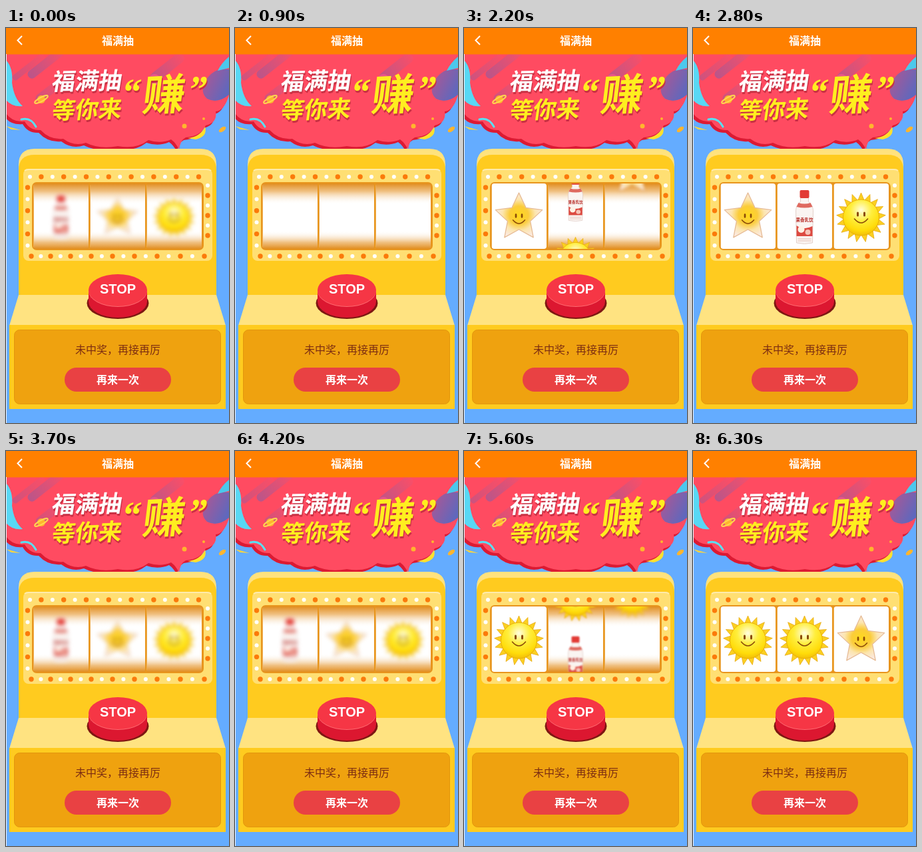
An HTML page that plays this animation: 335 px wide and 592 px high, repeating every 7.1 s.

```html
<!DOCTYPE html>
<html lang="zh-CN">
<head>
<meta charset="utf-8">
<title>福满抽</title>
<style>
html, body { margin: 0; height: 100%; overflow: hidden; background: #64acff; }
svg { display: block; }
#stage { width: 100vw; height: 100vh; }
text { font-family: "Noto Sans CJK SC", "Noto Sans CJK", "Noto Sans", sans-serif; text-anchor: middle; }
.brush { font-weight: 900; font-size: 35px; }
.quote { font-family: "Noto Serif", serif; font-size: 56px; }
.yellow { fill: #ffee1f; }
#slogan { fill: #fff; filter: drop-shadow(1px 3px 0 #c93043); }
</style>
</head>
<body>
<svg id="stage" viewBox="0 0 335 592">
<defs>
  <radialGradient id="sunFill" cy=".3" r=".75"><stop offset="0" stop-color="#fffde0"/><stop offset=".4" stop-color="#ffee3c"/><stop offset=".75" stop-color="#ffdc0a"/><stop offset="1" stop-color="#eeb406"/></radialGradient>
  <radialGradient id="starFill"><stop offset="0" stop-color="#ffd91c"/><stop offset=".4" stop-color="#fbcc3a"/><stop offset=".7" stop-color="#fce5ae"/><stop offset="1" stop-color="#fbe9dc"/></radialGradient>
  <linearGradient id="shade" x2="0" y2="1">
    <stop offset="0" stop-color="#e18d1f"/><stop offset=".12" stop-color="#edb56b" stop-opacity=".85"/><stop offset=".32" stop-color="#fff" stop-opacity="0"/>
    <stop offset=".72" stop-color="#fff" stop-opacity="0"/><stop offset=".9" stop-color="#edb56b" stop-opacity=".85"/><stop offset="1" stop-color="#e18d1f"/>
  </linearGradient>
  <linearGradient id="bar" x2="1"><stop offset="0" stop-color="#9a5a9c"/><stop offset="1" stop-color="#f8506a"/></linearGradient>
  <linearGradient id="orb" x2="1" y2=".6"><stop offset="0" stop-color="#b5558f"/><stop offset="1" stop-color="#5f68bd"/></linearGradient>
  <path id="cloud" d="M0 39H335V101Q328 124 315 125Q318 142 300 146Q293 162 270 164Q262 168 260 182Q255 172 248 167Q232 174 214 168Q196 182 168 177Q140 182 120 172Q102 178 86 166Q66 168 52 153Q36 154 28 140Q10 142 0 128Z"/>
  <g id="face" fill="none" stroke="#8a4a08" stroke-width="1.6" stroke-linecap="round">
    <path d="M-10 2Q0 14 10 2"/><path d="M-5-7v4M5-7v4" stroke-width="3"/>
  </g>
  <g id="sun"><path id="rays" fill="#fbd021" stroke="#e8a914" stroke-width=".8" stroke-linejoin="round"/><circle r="27" fill="url(#sunFill)" stroke="#e8ae0a"/><use href="#face"/></g>
  <g id="star"><path id="points" fill="url(#starFill)" stroke="#e6bb95" stroke-width="1.3" stroke-linejoin="round"/><use href="#face" transform="translate(0 2) scale(.9)"/></g>
  <g id="bottle">
    <path d="M-6-30H6V-24Q13-18 13-10L12 38Q0 41-12 38L-13-10Q-13-18-6-24Z" fill="#faf4f1" stroke="#dcc6bf" stroke-width=".8"/>
    <rect x="-7" y="-41" width="14" height="12" rx="2" fill="#e23b35"/>
    <path d="M-9-22Q0-19 9-22L12-16Q0-13-12-16Z" fill="#df6a60"/>
    <text y="6" font-size="6.5" font-weight="700" fill="#b72a25">果香乳饮</text>
    <path d="M-12 12Q-2 20 12 13L12 28H-12Z" fill="#dc4a41"/>
    <circle cx="-5" cy="18" r="5" fill="#fff0e4"/><circle cx="5" cy="22" r="4" fill="#f6c4b8"/>
    <path d="M-10 32H10M-10 35H10" stroke="#e3bdb5"/>
  </g>
</defs>

<!-- banner -->
<use href="#cloud" x="-3" y="4" fill="#dc1a33"/>
<path d="M273 165Q292 163 299 148Q303 163 285 167Z" fill="#ffe02c"/>
<use href="#cloud" fill="#ff4b61"/>
<path d="M0 48Q11 60 9 82Q12 106 25 117Q10 119 0 108Z" fill="#58d8f4"/>
<path d="M23 137Q37 133 45 148" fill="none" stroke="#58e0f4" stroke-width="3" stroke-linecap="round"/>
<path d="M0 147l22 6l-14-1z" fill="#ffd63a"/>
<g fill="url(#bar)">
  <rect width="66" height="13" rx="6" transform="translate(30 68) rotate(-38)" opacity=".7"/>
  <rect width="58" height="9" rx="4" transform="translate(8 73) rotate(-38)" opacity=".5"/>
  <rect width="48" height="13" rx="6" transform="translate(42 104) rotate(-38)" opacity=".5"/>
  <rect width="60" height="15" rx="7" transform="translate(214 72) rotate(-38)" opacity=".65"/>
</g>
<path d="M335 62Q312 58 299 80Q291 96 302 106Q318 114 335 100Z" fill="url(#orb)"/>
<path d="M335 43Q324 52 318 64L335 60Z" fill="#4bc8ec"/>
<circle cx="223" cy="77" r="8" fill="#e9568b"/>
<g fill="#ffb52d">
  <circle cx="53" cy="107" r="6"/><ellipse cx="53" cy="107" rx="11" ry="3" fill="none" stroke="#ffd84e" stroke-width="2" transform="rotate(-28 53 107)"/>
  <circle cx="268" cy="147" r="3.5"/><circle cx="297" cy="136" r="2"/><ellipse cx="325" cy="152" rx="6" ry="3" transform="rotate(-35 325 152)"/>
</g>
<g id="slogan">
  <text class="brush" transform="translate(120 92) rotate(-1) skewX(-10)">福满抽</text>
  <text class="brush yellow" transform="translate(120 135) rotate(-2) skewX(-10)">等你来</text>
  <text class="brush quote yellow" transform="translate(185 117) skewX(-10)">“</text>
  <text class="brush yellow" transform="translate(235 123) rotate(-3) skewX(-10)" style="font-size:64px">赚</text>
  <text class="brush quote yellow" transform="translate(285 113) skewX(-10)">”</text>
</g>

<!-- header -->
<rect width="335" height="39.5" fill="#ff8000"/>
<rect y="39" width="1" height="553" fill="#eef5ff"/>
<path d="M24 12L17.5 18.5L24 25" fill="none" stroke="#fff" stroke-width="2"/>
<text x="168" y="24.5" font-size="16" font-weight="700" fill="#fff">福满抽</text>

<!-- machine -->
<path d="M19 401V205Q19 181 43 181H292Q316 181 316 205V401Z" fill="#ffe27d"/>
<path d="M19 401V213Q19 190 43 190H292Q316 190 316 213V401Z" fill="#ffcb1f"/>
<path d="M19 400H316L330 446H5Z" fill="#ffe381"/>
<rect x="5" y="445" width="325" height="126" fill="#ffcb1f"/>
<rect x="12.5" y="452.5" width="310" height="111" rx="8" fill="#efa20f" stroke="#e2960d"/>
<text x="168" y="488" font-size="16" fill="#7c2d12">未中奖，再接再厉</text>
<rect x="88" y="509" width="160" height="36" rx="18" fill="#e94143"/>
<text x="168" y="532.5" font-size="16" font-weight="700" fill="#fff">再来一次</text>
<rect x="26" y="211" width="284" height="138" rx="8" fill="#ffdf73"/>
<path d="M28 214Q30 212 34 212H302Q306 212 308 214" fill="none" stroke="#ffebab" stroke-width="2"/>
<g id="bulbs"></g>
<rect x="39" y="231" width="258" height="102" rx="7" fill="#e8951d"/>
<g id="reels"></g>

<!-- stop button -->
<ellipse cx="168" cy="412.5" rx="46.5" ry="23.5" fill="#7e1712"/>
<path d="M124 393V410A44 24 0 0 0 212 410V393Z" fill="#dc1730"/>
<ellipse cx="168" cy="394" rx="44" ry="24" fill="#ff6a70"/>
<ellipse cx="168" cy="393" rx="44" ry="24" fill="#f63645"/>
<text x="168" y="398" font-size="20" font-weight="700" fill="#fff" style="font-family:'Liberation Sans',Arial,sans-serif">STOP</text>
</svg>

<script>
const $ = id => document.getElementById(id);

// closed zigzag between two radii
function spikes(n, outer, inner) {
  const pts = [];
  for (let i = 0; i < n * 2; i++) {
    const a = i * Math.PI / n, r = i % 2 ? inner : outer;
    pts.push((r * Math.sin(a)).toFixed(1) + ' ' + (-r * Math.cos(a)).toFixed(1));
  }
  return 'M' + pts.join('L') + 'Z';
}
$('rays').setAttribute('d', spikes(17, 37, 26));
$('points').setAttribute('d', spikes(5, 37, 18));

const bulb = (x, y, hot) => `<circle cx="${x}" cy="${y}" r="${hot ? 3.7 : 3}" fill="${hot ? '#fb7a0a' : '#fff'}"/>`;
let bulbs = '';
for (let i = 0; i < 17; i++) {
  if (i < 16) bulbs += bulb(36 + 16.9 * i, 223, i % 2);
  bulbs += bulb(38 + 14.25 * i + i * i / 8, 342, i % 2 == 0);
  if (i < 6) bulbs += bulb(32.5, 239 + 17.4 * i, i % 2 == 0) + bulb(303, 236 + 15 * i, i % 2);
}
$('bulbs').innerHTML = bulbs;

const LOOP = 7100, STEP = 100;
const ORDER = ['bottle', 'star', 'sun'];
const CELL = { spin: 100, slow: 85 };
const DRAG = 6.5;
const SPINS = [
  { start: 0, stops: [2000, 2400, 2800], result: ['star', 'bottle', 'sun'] },
  { start: 3700, stops: [5500, 5900, 6300], result: ['sun', 'sun', 'star'] }
];

function item(name, y, blur) {
  const look = blur ? `scale(.85 .8)" style="filter:blur(${blur}px)` : '';
  return `<g transform="translate(41 ${y + 51})"><use href="#${name}" transform="${look}"/></g>`;
}

function reel(i, spin, t) {
  const left = (spin.stops[i] - t) / STEP, final = spin.result[i];
  let parts = '';
  const add = (name, y, blur) => { if (Math.abs(y) < 95) parts += item(name, y, blur); };
  if (left <= 0) add(final, 0, 0);
  else if (left <= 4 + 1.5 * i) {
    // braking: quadratic approach to the final cell
    const rest = final == 'star' ? ['bottle', 'star', 'sun'] : [final == 'sun' ? 'bottle' : 'sun', 'star'];
    [final, ...rest].forEach((name, j) => add(name, j * CELL.slow - DRAG * left * left, Math.min(4, left * .45)));
  } else {
    // three symbols and two empty cells roll downwards
    const phase = (t - spin.start) / STEP % 5;
    for (let j = 0; j < 3; j++) add(ORDER[(i + 2 * j) % 3], (phase - j) * CELL.spin, 4);
  }
  const shade = left > 0 ? '<rect width="82.5" height="98" fill="url(#shade)"/>' : '';
  return `<svg x="${41.5 + 85 * i}" y="233" width="82.5" height="98"><rect width="82.5" height="98" rx="4" fill="#fff"/>${shade}${parts}</svg>`;
}

let shown = -1;
function draw(now) {
  const t = Math.floor(now % LOOP / STEP) * STEP;
  if (t != shown) {
    const spin = SPINS[t < SPINS[1].start ? 0 : 1];
    $('reels').innerHTML = [0, 1, 2].map(i => reel(i, spin, t)).join('');
    shown = t;
  }
  requestAnimationFrame(() => draw(performance.now() - origin));
}
const origin = performance.now();
draw(0);
</script>
</body>
</html>
```
